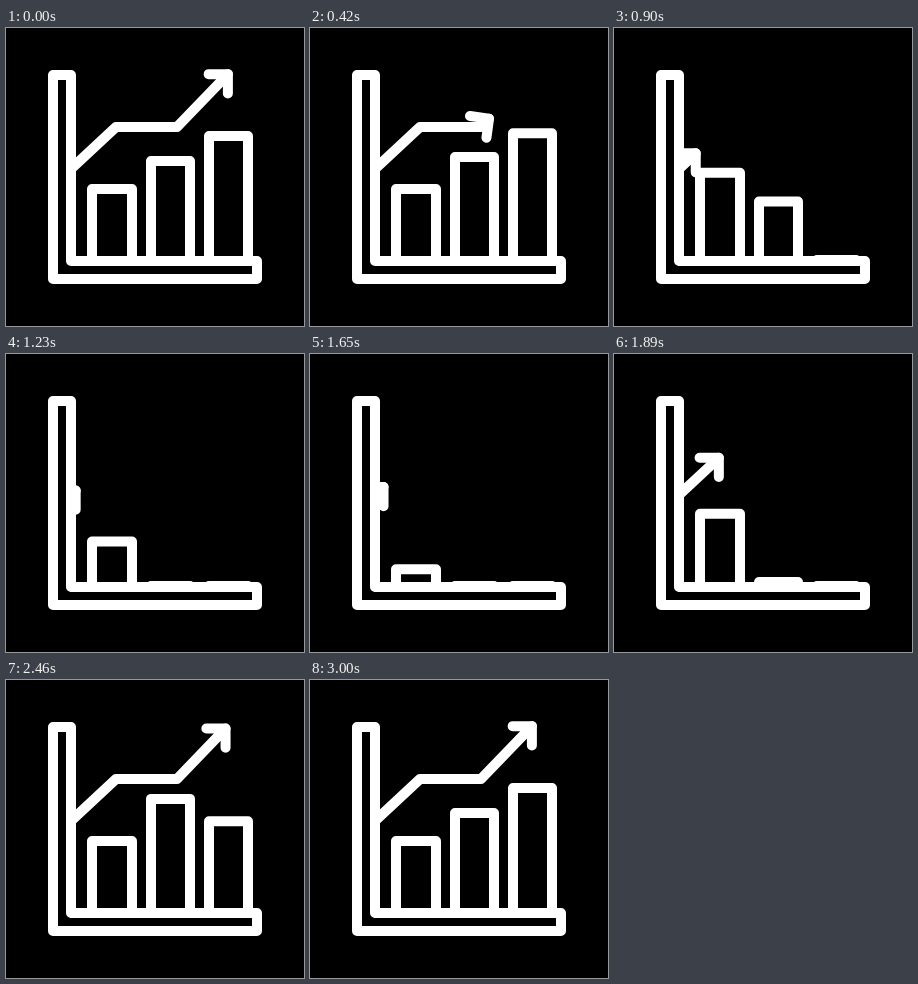
Write an HTML page that moves like this. It is 298 px wide and 298 px high and loops after 3.33 s.

```html
<!DOCTYPE html>
<html lang="en">
<head>
<meta charset="utf-8">
<title>Growth chart</title>
<style>
  html, body { margin: 0; width: 100%; height: 100%; overflow: hidden; background: #000; }
  svg { display: block; width: 100%; height: 100%; }
  path { fill: none; stroke: #fff; stroke-width: 10; stroke-linecap: round; stroke-linejoin: round; }
</style>
</head>
<body>
<svg viewBox="0 0 298 298">
  <clipPath id="plot"><rect x="65" y="0" width="233" height="298"/></clipPath>
  <g id="bars"></g>
  <g clip-path="url(#plot)">
    <path id="trend" d="M66 140L110 99H171L236 31.5"/>
    <path id="head" d="M-13.6 -13.6L0 0L-13.6 13.6"/>
  </g>
  <path d="M47 47H65V233H251V251H47Z"/>
</svg>
<script>
  const LOOP = 3330, END = 3000, STEP = 30;
  const FLOOR = 232, LIFT = 18;
  const FULL = 194.5, HIDDEN = 5, OVERSHOOT = 203;

  const trend = document.getElementById('trend');
  const head = document.getElementById('head');

  const bars = [
    { left: 86, right: 126, top: 161, start: 660, fall: 540 },
    { left: 145, right: 184, top: 133, start: 330, fall: 540 },
    { left: 203, right: 242, top: 108, start: 0, fall: 590 }
  ];
  for (const bar of bars) {
    bar.path = document.createElementNS('http://www.w3.org/2000/svg', 'path');
    document.getElementById('bars').append(bar.path);
  }

  // Eased progress of t between two times
  function ease(t, from, to) {
    const p = Math.min(1, Math.max(0, (t - from) / (to - from)));
    return p * p * (3 - 2 * p);
  }
  const mix = (a, b, p) => a + (b - a) * p;

  // Each bar lifts a little, then drops; the second half runs backwards
  function drawBar(bar, t) {
    const local = Math.min(t, END - t) - bar.start;
    const peak = bar.top - LIFT;
    const y = local < 300
      ? mix(bar.top, peak, ease(local, 0, 300))
      : mix(peak, FLOOR, ease(local, 300, 300 + bar.fall));
    bar.path.setAttribute('d', `M${bar.left} 233V${y}H${bar.right}V233Z`);
  }

  function trendLength(t) {
    if (t < 1500) return mix(FULL, HIDDEN, ease(t, 0, 1100));
    if (t < 2620) return mix(HIDDEN, OVERSHOOT, ease(t, 1545, 2620));
    return mix(OVERSHOOT, FULL, ease(t, 2620, END));
  }

  function drawTrend(t) {
    const length = trendLength(t);
    const tip = trend.getPointAtLength(length);
    const angle = -45 * (1 - ease(length, 57, 77) + ease(length, 118, 138));
    trend.setAttribute('stroke-dasharray', `${length} 999`);
    head.setAttribute('transform', `translate(${tip.x} ${tip.y}) rotate(${angle})`);
  }

  function draw(now) {
    const t = Math.min(END, Math.floor((now % LOOP) / STEP) * STEP);
    bars.forEach(bar => drawBar(bar, t));
    drawTrend(t);
  }

  const begin = performance.now();
  function tick() {
    draw(performance.now() - begin);
    requestAnimationFrame(tick);
  }
  tick();
</script>
</body>
</html>
```
